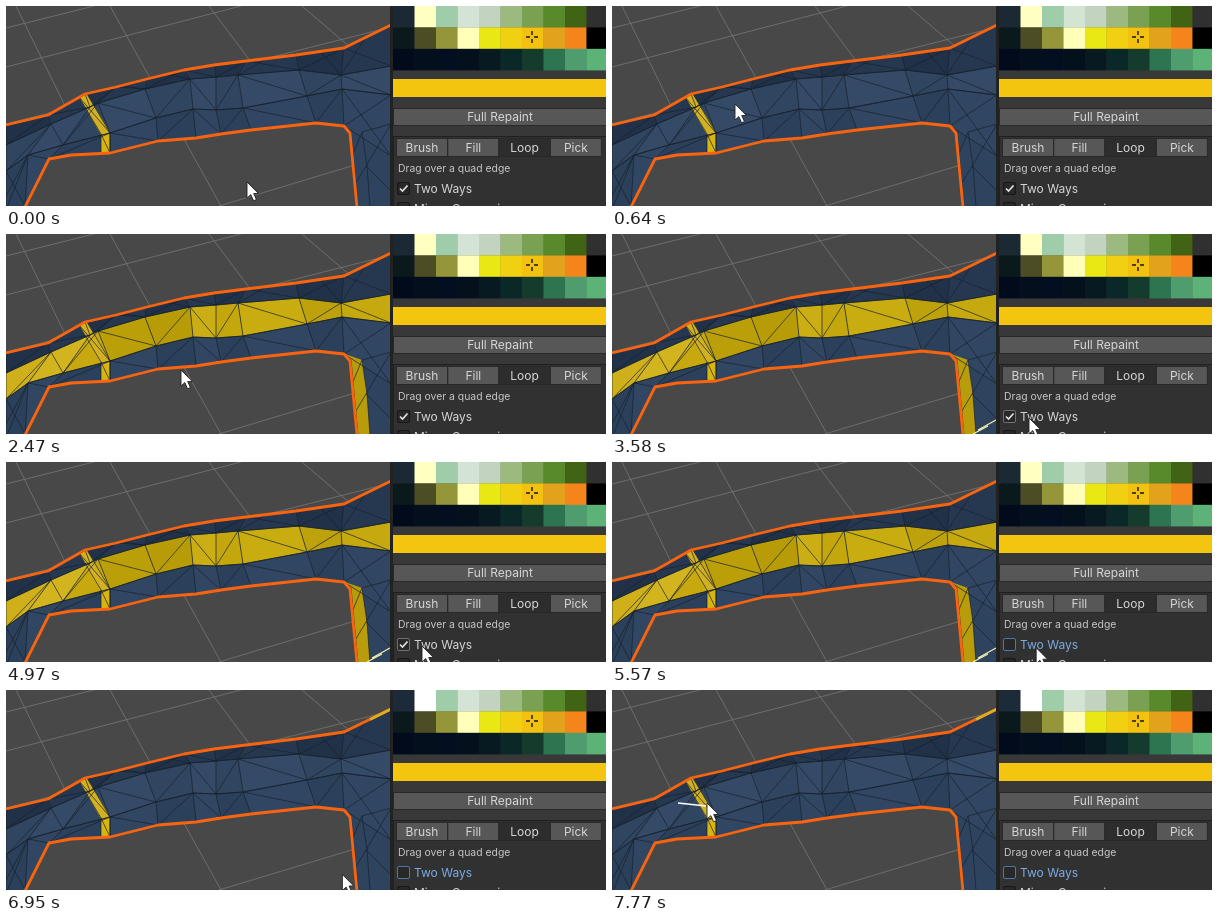
These frames come from a looping animation (600 px wide and 200 px high, 8000 ms). An HTML page:

```html
<!DOCTYPE html>
<html lang="en">
<head>
<meta charset="utf-8">
<title>Loop painting</title>
<style>
html, body { margin: 0; width: 600px; height: 200px; overflow: hidden; background: #484848; }
svg { display: block; }
text { font-family: Inter, Roboto, sans-serif; font-size: 12px; fill: #d6d6d6; }
.mid { text-anchor: middle; }
.wire { fill: none; stroke: #17212e; stroke-width: .7; }
.preview { fill: none; stroke: #f3c50d; stroke-width: 1; }
.outline { fill: none; stroke: #fa640f; stroke-width: 2.8; stroke-linejoin: round; }
</style>
</head>
<body>
<svg id="stage" width="600" height="200" viewBox="0 0 600 200"></svg>
<script>
const LOOP = 8000, STEP = 70;
const stage = document.getElementById('stage');

function add(parent, tag, attrs, text) {
  const node = document.createElementNS('http://www.w3.org/2000/svg', tag);
  for (const key in attrs) node.setAttribute(key, attrs[key]);
  if (text) node.textContent = text;
  parent.appendChild(node);
  return node;
}
const group = (parent, attrs = {}) => add(parent, 'g', attrs);
const rect = (parent, x, y, width, height, fill, more = {}) =>
  add(parent, 'rect', { x, y, width, height, fill, ...more });
const path = (parent, d, attrs) => add(parent, 'path', { d, ...attrs });
const line = points => 'M' + points.join('L');
const show = (node, on) => node.setAttribute('visibility', on ? 'visible' : 'hidden');

// Each column runs from the upper silhouette to the lower one.
const columns = [
  [[0, 119], [0, 139], [0, 165], [0, 204]],
  [[42, 109], [45, 118], [22, 149], [19, 201]],
  [[79, 88], [84, 101], [57, 139], [43, 153]],
  [[110, 81], [92, 97], [104, 127], [104, 147]],
  [[141, 73], [139, 83], [150, 112], [152, 135]],
  [[178, 64], [184, 73], [187, 103], [190, 132]],
  [[208, 59], [210, 71], [210, 104], [215, 128]],
  [[240, 55], [232, 69], [237, 102], [245, 124]],
  [[290, 49], [293, 64], [301, 90], [310, 117]],
  [[338, 42], [335, 69], [336, 83], [338, 120]],
  [[385, 19], [385, 60], [385, 89], [385, 150]]
];
const row = i => columns.map(c => c[i]);
const blues = [['#213148', '#263850'], ['#30455f', '#344a67'], ['#2b405a', '#304662']];
const golds = ['#d0b01a', '#d2b41e', '#c7a90f', '#bb9f08', '#b79c08', '#cbae13', '#c3a70d', '#c8ac10', '#bda20b', '#c6a90e'];
const leg = [[339, 120], [345, 126], [352, 201], [364, 201], [361, 160], [356, 126]];
const underside = [[43, 152], [96, 139], [145, 132], [190, 125], [245, 117], [300, 106], [338, 114], [356, 126]];
const lower = [[19, 201], [43, 153], [65, 149], [104, 147], [152, 135], [190, 132], [215, 128], [245, 124], [310, 117], [338, 120], [344, 127], [351, 201]];

function cell(i, r) {
  const [a, b] = [columns[i], columns[i + 1]];
  return [a[r], b[r], b[r + 1], a[r + 1]];
}
function wires(r) {
  let d = line(row(r)) + line(row(r + 1));
  for (let i = 0; i < 10; i++) {
    const [a, b, c, e] = cell(i, r);
    d += line([a, e]) + line(i % 2 ? [a, c] : [b, e]);
  }
  return d;
}

const scene = group(stage);
rect(scene, 0, 0, 386, 200, '#484848');
path(scene, 'M0 61L235 0M0 118L385 21M0 22L88 0M10 0L62 106M104 0L215 200M203 0L248 60M296 0L345 42M213 200L352 158',
  { fill: 'none', stroke: '#777', 'stroke-width': .8 });

path(scene, line([...row(0), [385, 201], ...lower.slice().reverse(), [0, 201]]) + 'Z', { fill: '#2d435e' });
for (let r = 0; r < 3; r++)
  for (let i = 0; i < 10; i++)
    path(scene, line(cell(i, r)) + 'Z', { fill: blues[r][i % 2], 'clip-path': 'url(#body)' });
const clip = add(add(stage, 'defs'), 'clipPath', { id: 'body' });
path(clip, line([...row(0), [385, 201], ...lower.slice().reverse(), [0, 201]]) + 'Z');

const paint = group(scene);
golds.forEach((fill, i) => path(paint, line(cell(i, 1)) + 'Z', { fill }));
path(paint, line(leg) + 'Z', { fill: '#b89c0b' });

const ring = group(scene);
path(ring, 'M73 91L81 88L104 126L95 129Z', { fill: '#d1b021' });
path(ring, 'M95 128L104 126V147L95 146Z', { fill: '#d9b512' });

path(scene, [0, 1, 2].map(wires).join('') + line(leg) +
  'M73 91L95 128V146M81 88L104 127V147M73 91L104 127M95 128L104 147' +
  'M338 120L385 89M356 126L385 118M360 160L385 118M360 160L385 185M346 150L356 126M348 180L360 160' +
  'M0 165L19 200M22 149L0 190M116 80L139 83M160 68L184 73M260 53L232 69M315 46L335 69M360 31L335 69',
  { class: 'wire', 'clip-path': 'url(#body)' });

const preview = group(scene, { class: 'preview', 'clip-path': 'url(#body)' });
path(preview, wires(1) + line(underside) + line(leg) + 'M43 153L65 149L104 147L152 135L190 132L245 124L310 117L338 120' +
  underside.slice(1, 7).map((p, i) => line([lower[i + 3], p, lower[i + 4]])).join('') +
  'M347 150L361 160L349 178L364 200M356 126L347 150M0 165L22 149L0 190');

path(scene, line(row(0)), { class: 'outline' });
path(scene, line(lower), { class: 'outline' });
const glint = path(scene, 'M364 29.5L385 19', { class: 'outline', style: 'stroke:#dfad20' });
const streak = path(scene, 'M361 200L376 192M366 196L384 186', { stroke: '#f3efad', 'stroke-width': 1.2 });
const disc = add(scene, 'circle', { cx: 105, r: 12, fill: '#c8bd0b', opacity: .72 });
const drag = path(scene, '', { stroke: '#fff', 'stroke-width': 1.3 });

const panel = group(stage);
rect(panel, 384, 0, 216, 200, '#222');
rect(panel, 387, 0, 213, 200, '#383838');
const palette = [
  ['#1a2933', '#ffffbf', '#9fcda9', '#d3e4d5', '#c2d3bf', '#9cba80', '#79a151', '#588a2c', '#416414', '#303030'],
  ['#0a191b', '#2c2c17', '#4c4c25', '#95953a', '#ffffb9', '#e9e814', '#f3c10f', '#e2a21b', '#f5841b', '#000'],
  ['#020b1b', '#030f1d', '#030f20', '#04111d', '#081a21', '#0a2827', '#153b2c', '#2d7551', '#4f9c6f', '#5db277']
];
// The second row starts one olive cell earlier than the ramp above it.
palette[1].splice(1, 1);
palette[1].splice(5, 0, '#f0d010');
const swatches = palette.map((colors, y) => colors.map((fill, x) =>
  rect(panel, 387 + x * 21.5, y * 21.4, 21.8, 21.6, fill)));
path(panel, 'M520 31H524M528 31H532M526 25V29M526 33V37', { stroke: '#17150a', 'stroke-width': 1.4 });
rect(panel, 387, 73, 213, 18, '#f3c50e');

function button(x, y, width, height, label, fill = '#575757') {
  rect(panel, x, y, width, height, fill, { stroke: '#292929', 'stroke-width': 1 });
  add(panel, 'text', { x: x + width / 2, y: y + height / 2 + 4.4, class: 'mid' }, label);
}
button(387.5, 102.5, 213, 17, 'Full Repaint');
rect(panel, 387.5, 130.5, 213, 80, '#313131', { stroke: '#202020' });
['Brush', 'Fill', 'Loop', 'Pick'].forEach((label, i) =>
  button(390.5 + i * 51.3, 132.5, 51, 18, label, label === 'Loop' ? '#2d2d2d' : '#575757'));
add(panel, 'text', { x: 392, y: 166, style: 'font-size:10.4px;fill:#c5c5c5' }, 'Drag over a quad edge');
const box = rect(panel, 391.5, 176.5, 12, 12, '#282828', { rx: 1.5, stroke: '#171717' });
const tick = path(panel, 'M394 182.5L396.5 185L401.5 179.5', { fill: 'none', stroke: '#e4e4e4', 'stroke-width': 1.6 });
const twoWays = add(panel, 'text', { x: 408, y: 187 }, 'Two Ways');
rect(panel, 391.5, 196.5, 12, 12, '#282828', { rx: 1.5, stroke: '#171717' });
add(panel, 'text', { x: 408, y: 207 }, 'Mirror Comparison');

const pointer = path(stage, 'M0 0V16L3.8 12.6L6.6 18.8L9.4 17.5L6.7 11.5H11.4Z',
  { fill: '#fff', stroke: '#222', 'stroke-width': .9 });

// Pointer keys: time, x, y.
const keys = [
  [70, 241, 176], [450, 72, 112], [640, 123, 98], [970, 123, 98], [1460, 106, 116],
  [2190, 106, 116], [2470, 175, 136], [2970, 379, 184], [3040, 384, 186],
  [3580, 417, 184], [4900, 417, 184], [4970, 416, 184], [5230, 416, 184],
  [5880, 435, 188], [6010, 435, 188], [6080, 434, 187], [6340, 434, 187], [6480, 400, 203],
  [6880, 382, 201], [7380, 56, 83], [7640, 62, 99], [7769, 62, 99], [7770, 95, 113]
];
function pointerAt(t) {
  const next = keys.findIndex(k => k[0] > t);
  if (next === 0) return keys[0].slice(1);
  if (next < 0) return keys[keys.length - 1].slice(1);
  const [a, b] = [keys[next - 1], keys[next]];
  const held = Math.floor((t - a[0]) / STEP + .01) * STEP;
  const p = held / (b[0] - a[0]);
  return [a[1] + (b[1] - a[1]) * p, a[2] + (b[2] - a[2]) * p];
}

function render(t) {
  const [x, y] = pointerAt(t);
  const dragging = t >= 970 && t < 1860;
  const undone = t >= 5580;
  const unchecked = t >= 5300;
  pointer.setAttribute('transform', `translate(${x} ${y})`);
  show(pointer, t < 6480 || t >= 6880);
  show(paint, t >= 1860 && !undone);
  show(preview, t >= 1110 && t < 2190);
  show(disc, dragging);
  disc.setAttribute('cx', x - 1);
  disc.setAttribute('cy', y);
  ring.setAttribute('opacity', dragging ? .8 : 1);
  show(drag, dragging || t >= 7770);
  drag.setAttribute('d', t >= 7770 ? 'M66 113L94 116' : `M124 94L${x} ${y}`);
  show(streak, t >= 3040 && t < 6880);
  show(glint, undone);
  show(tick, !unchecked);
  box.setAttribute('stroke', unchecked ? '#4b78a8' : t >= 3510 ? '#707070' : '#171717');
  twoWays.style.fill = unchecked ? '#7cabe4' : '#d6d6d6';
  swatches[0][0].setAttribute('fill', undone ? '#1c2a3a' : '#1a2933');
  swatches[0][1].setAttribute('fill', undone ? '#fff' : '#ffffbf');
}

function tick60(now) {
  render(now % LOOP);
  requestAnimationFrame(tick60);
}
render(0);
requestAnimationFrame(tick60);
</script>
</body>
</html>
```
